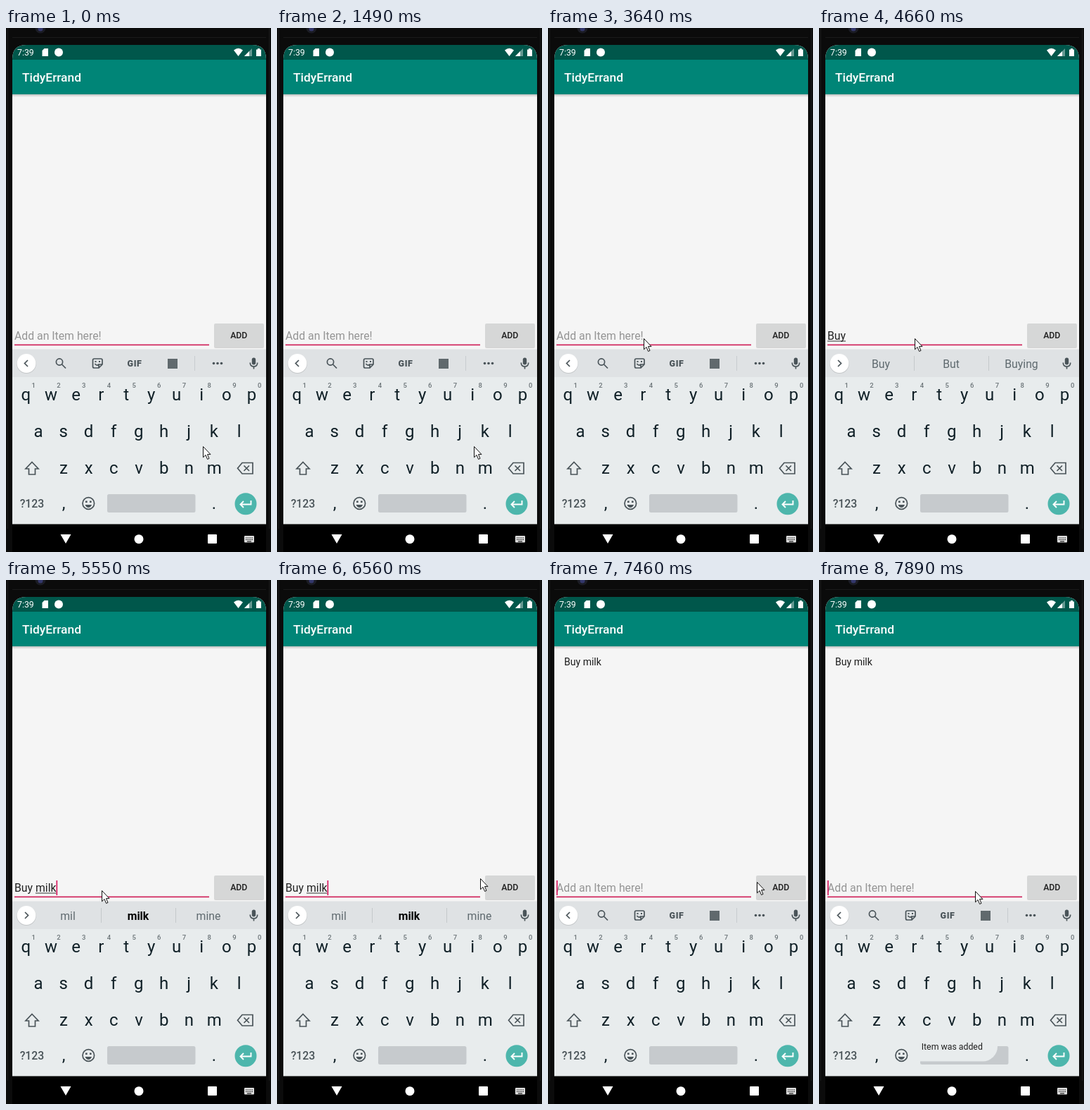
Animation, 377 px wide and 743 px high, one loop 8 s. Source, as an HTML page:

```html
<!DOCTYPE html>
<html lang="en">
<head>
<meta charset="utf-8">
<title>To-do app</title>
<style>
html, body { margin: 0; width: 100%; height: 100%; overflow: hidden; background: #0b0b0b; }
svg { display: block; width: 377px; height: 743px; font-family: Roboto, sans-serif; }
text { white-space: pre; }
.mid { text-anchor: middle; }
.key { font-size: 24px; fill: #102027; text-anchor: middle; }
.digit { font-size: 9.5px; font-weight: 500; fill: #6b7478; text-anchor: middle; }
.field { font-size: 15.8px; }
.word { font-size: 15.8px; fill: #5f6a6f; text-anchor: middle; }
.line { fill: none; stroke: #4a5459; stroke-width: 1.7; }
.icon { fill: #4a5459; }
</style>
</head>
<body>
<svg viewBox="0 0 377 743">
  <defs>
    <linearGradient id="shade" x2="0" y2="1">
      <stop offset="0" stop-opacity=".22"/><stop offset="1" stop-opacity="0"/>
    </linearGradient>
    <clipPath id="screen"><path d="M9 743V44Q9 24 29 24H350Q370 24 370 44V743Z"/></clipPath>
  </defs>

  <!-- phone body -->
  <rect width="377" height="743" fill="#0b0b0b"/>
  <path d="M2.5 0V710M374.5 0V710M9 13.5H370" stroke="#1a1a1a" fill="none"/>
  <circle cx="49" cy="0" r="7.5" fill="#1b1c24"/>
  <circle cx="49" cy="1" r="3.5" fill="#34386c"/>

  <g clip-path="url(#screen)">
    <rect x="9" y="24" width="361" height="719" fill="#f5f5f5"/>
    <rect x="9" y="24" width="361" height="21" fill="#00574b"/>
    <rect x="9" y="45" width="361" height="49" fill="#008577"/>
    <rect x="9" y="94" width="361" height="4" fill="url(#shade)"/>
    <rect x="9" y="455.5" width="361" height="40" fill="#dfe2e4"/>
    <rect x="9" y="495" width="361" height="208.5" fill="#e8eced"/>
    <rect x="9" y="703.5" width="361" height="40" fill="#000"/>
  </g>

  <!-- status bar and title -->
  <g fill="#fff">
    <text x="16" y="39" font-size="12.3">7:39</text>
    <path d="M54.500 29H60V40H51.500V32Z"/>
    <circle cx="75" cy="34.500" r="6"/>
    <path d="M324 31.500Q330.500 26 337 31.500L330.500 40Z"/>
    <path d="M339 40L350 29V40Z" opacity=".4"/>
    <path d="M339 40L346 33V40Z"/>
    <path d="M356 30.500H358V29H361V30.500H363V40H356Z"/>
    <text x="23" y="76" font-size="17.4" font-weight="500">TidyErrand</text>
  </g>

  <text id="item" x="23" y="120.500" font-size="14.05" fill="#1d1d1d">Buy milk</text>

  <!-- input row -->
  <text id="entry" class="field" x="12" y="442"/>
  <rect id="mark" y="443.500" height="1" fill="#333"/>
  <rect x="12" y="448.500" width="277" height="1.700" fill="#d0245c"/>
  <rect id="caret" y="426" width="1.700" height="21" fill="#d81b60"/>
  <rect id="shadow" x="296" y="421" width="71" height="33" rx="2" opacity=".13"/>
  <rect id="button" x="296" y="419" width="71" height="33" rx="2"/>
  <text class="mid" x="331.300" y="440.300" font-size="12.3" font-weight="500" fill="#202020">ADD</text>

  <!-- strip above the keys -->
  <circle cx="29" cy="476.300" r="13.800" opacity=".12"/>
  <circle cx="29" cy="475.500" r="13.400" fill="#fff"/>
  <path id="chevron" class="line"/>
  <g id="tools">
    <circle class="line" cx="76" cy="473.500" r="4.600"/>
    <path class="line" d="M79.500 477L85 482.500" stroke-width="2"/>
    <path class="line" d="M125.500 469H135Q137 469 137 471V477L132 482H125.500Q123.500 482 123.500 480V471Q123.500 469 125.500 469ZM137 477H132V482M126.500 476Q129 479.500 132 477"/>
    <path class="icon" d="M126.500 472h2v2h-2zM132 472h2v2h-2z"/>
    <text class="mid icon" x="183" y="479.500" font-size="12.500" font-weight="900" letter-spacing=".6">GIF</text>
    <rect class="icon" x="230" y="469" width="14" height="14" fill-opacity=".85"/>
    <path d="M268.500 465V486" stroke="#c8cccf"/>
    <g class="icon"><circle cx="295.500" cy="475.500" r="1.800"/><circle cx="301" cy="475.500" r="1.800"/><circle cx="306.500" cy="475.500" r="1.800"/></g>
  </g>
  <g id="words">
    <path d="M135.500 465V486M241.500 465V486" stroke="#c3c8ca"/>
    <text class="word" x="88" y="481.500"/>
    <text class="word" x="188" y="481.500"/>
    <text class="word" x="288" y="481.500"/>
    <g id="glass"><rect x="183.500" y="468.500" width="9.500" height="16" rx="1.500" fill="#f3f4f4" stroke="#cdd1d3"/><path d="M184 472.500H193" stroke="#c2c7c9"/></g>
  </g>
  <rect class="icon" x="349.800" y="467.500" width="5.400" height="10" rx="2.700"/>
  <path class="line" d="M347.300 474.500Q347.300 480 352.500 480T357.700 474.500M352.500 480V483.500"/>

  <!-- keyboard -->
  <g id="keys"></g>
  <path class="line" d="M37 615.500L46 625H41.500V633H32.500V625H28Z"/>
  <path class="line" d="M336 616.500H351V632H336L329.500 624.300ZM338.500 620.500L346 628M346 620.500L338.500 628"/>
  <text class="mid" x="37" y="680" font-size="15.800" font-weight="500" fill="#4a5459">?123</text>
  <text class="key" x="82" y="682">,</text>
  <text class="key" x="296" y="682">.</text>
  <circle class="line" cx="117.300" cy="674" r="8.300"/>
  <path class="icon" d="M113 670.500h2.600v2.600h-2.600zM119 670.500h2.600v2.600h-2.600zM112.500 676H122Q120.500 680 117.300 680T112.500 676Z"/>
  <rect x="144" y="661" width="125.500" height="26" rx="2.500" fill="#c6cacd"/>
  <circle cx="341" cy="674.800" r="15.500" fill="#4db6ac"/>
  <path d="M348.500 670V675.500H333.500M338 671L333.500 675.500L338 680" fill="none" stroke="#fff" stroke-width="1.900"/>

  <!-- navigation bar -->
  <g fill="#fff">
    <path d="M77.500 718H92.500L85 731Z"/>
    <circle cx="189" cy="724.700" r="6.500"/>
    <rect x="287" y="718" width="13" height="13" rx="1"/>
    <rect x="339" y="720" width="14" height="9.500" rx="1" fill="#ddd"/>
    <path d="M341 723H352M341 725.500H352" stroke="#000" stroke-dasharray="1.200 1"/>
    <path d="M343 728H349" stroke="#000"/>
  </g>

  <g id="toast">
    <rect x="124" y="640" width="130" height="42.500" rx="21" fill="#e8eced"/>
    <text class="mid" x="189.300" y="666" font-size="12.3" fill="#202020">Item was added</text>
  </g>
  <path id="pointer" d="M.500 .500V15.800L4 12.500L6.600 18.500L9 17.400L6.500 11.600H11Z" fill="#fff" stroke="#111"/>
</svg>
<script>
const LOOP = 8000;
const $ = id => document.getElementById(id);
const set = (id, attrs) => { for (const k in attrs) $(id).setAttribute(k, attrs[k]); };
const show = (id, on) => set(id, { display: on ? 'inline' : 'none' });

const ruler = document.createElement('canvas').getContext('2d');
const widthOf = s => {
  ruler.font = '15.8px Roboto, sans-serif';
  return ruler.measureText(s).width;
};

// Letter rows: [letters, first centre, baseline]
const rows = [['qwertyuiop', 28.3, 528], ['asdfghjkl', 46, 580], ['zxcvbnm', 82, 631.5]];
$('keys').innerHTML = rows.map(([letters, x, y], row) =>
  [...letters].map((c, i) => {
    const cx = x + 35.7 * i;
    const digit = row ? '' : `<text class="digit" x="${cx + 11}" y="510">${(i + 1) % 10}</text>`;
    return `<text class="key" x="${cx}" y="${y}">${c}</text>${digit}`;
  }).join('')).join('');

// Each track holds [start, value]; a value stays until the next start.
const typed = [[0, ''], [2920, 'B'], [3050, ''], [3770, 'B'], [3920, 'Bu'], [4220, 'Buy'],
  [4810, 'Buy '], [4960, 'Buy m'], [5400, 'Buy mil'], [5550, 'Buy milk'], [7150, '']];
const hints = [[0, ''], [3920, 'But,Buy,Bus'], [4220, 'Buy,But,Buying'], [4810, 'a,the,it'],
  [4960, 'my,more,me'], [5400, 'mil,milk,mill'], [5550, 'mil,*milk,mine'],
  [7150, 'milk,,Mike'], [7300, '']];
const caretOn = [[0, 0], [160, 1], [610, 0], [1050, 1], [1490, 0], [1930, 1], [2360, 0],
  [2790, 1], [3640, 0], [3770, 1], [4660, 0], [4810, 1]];
const pointerAt = [[0, [280, 593]], [1790, [264, 574]], [1930, [222, 528]], [2070, [170, 476]],
  [2210, [150, 457]], [2360, [139, 444]], [2490, [136, 440]],
  [6300, [168, 437]], [6430, [238, 428]], [6560, [289, 423]], [6680, [302, 427]],
  [7450, [297, 428]], [7600, [268, 434]], [7740, [236, 440]], [7890, [222, 441]]];
const toastAlpha = [[0, 0], [7600, .35], [7740, .8], [7890, 1]];
const buttonFill = [[0, '#d6d7d7'], [7150, '#b9bbba'], [7300, '#c9cbca'], [7450, '#d6d7d7']];

const at = (track, t) => track.findLast(([start]) => start <= t)[1];

function draw(t) {
  const text = at(typed, t);
  const entry = $('entry');
  entry.textContent = text || 'Add an Item here!';
  entry.setAttribute('fill', text ? '#212121' : '#959595');

  // The word being composed is underlined.
  const from = text.lastIndexOf(' ') + 1;
  set('mark', { x: 12 + widthOf(text.slice(0, from)), width: widthOf(text.slice(from)) });
  set('caret', { x: 12 + widthOf(text) });
  show('caret', at(caretOn, t));

  const hint = at(hints, t);
  show('tools', !hint);
  show('words', hint);
  show('glass', hint.includes(',,'));
  set('chevron', { d: hint ? 'M27 471L31.500 475.500L27 480' : 'M31 471L26.500 475.500L31 480' });
  const words = hint.split(',');
  document.querySelectorAll('.word').forEach((el, i) => {
    const word = words[i] || '';
    const best = word[0] === '*';
    el.textContent = best ? word.slice(1) : word;
    el.style.fontWeight = best ? 700 : 400;
    el.style.fill = best ? '#000' : '';
  });

  set('button', { fill: at(buttonFill, t) });
  set('shadow', { opacity: t >= 7150 && t < 7450 ? .3 : .13 });
  show('item', t >= 7300);
  set('toast', { opacity: at(toastAlpha, t) });
  set('pointer', { transform: `translate(${at(pointerAt, t)})` });
}

const begin = performance.now();
function tick() {
  draw((performance.now() - begin) % LOOP);
  requestAnimationFrame(tick);
}
tick();
</script>
</body>
</html>
```
